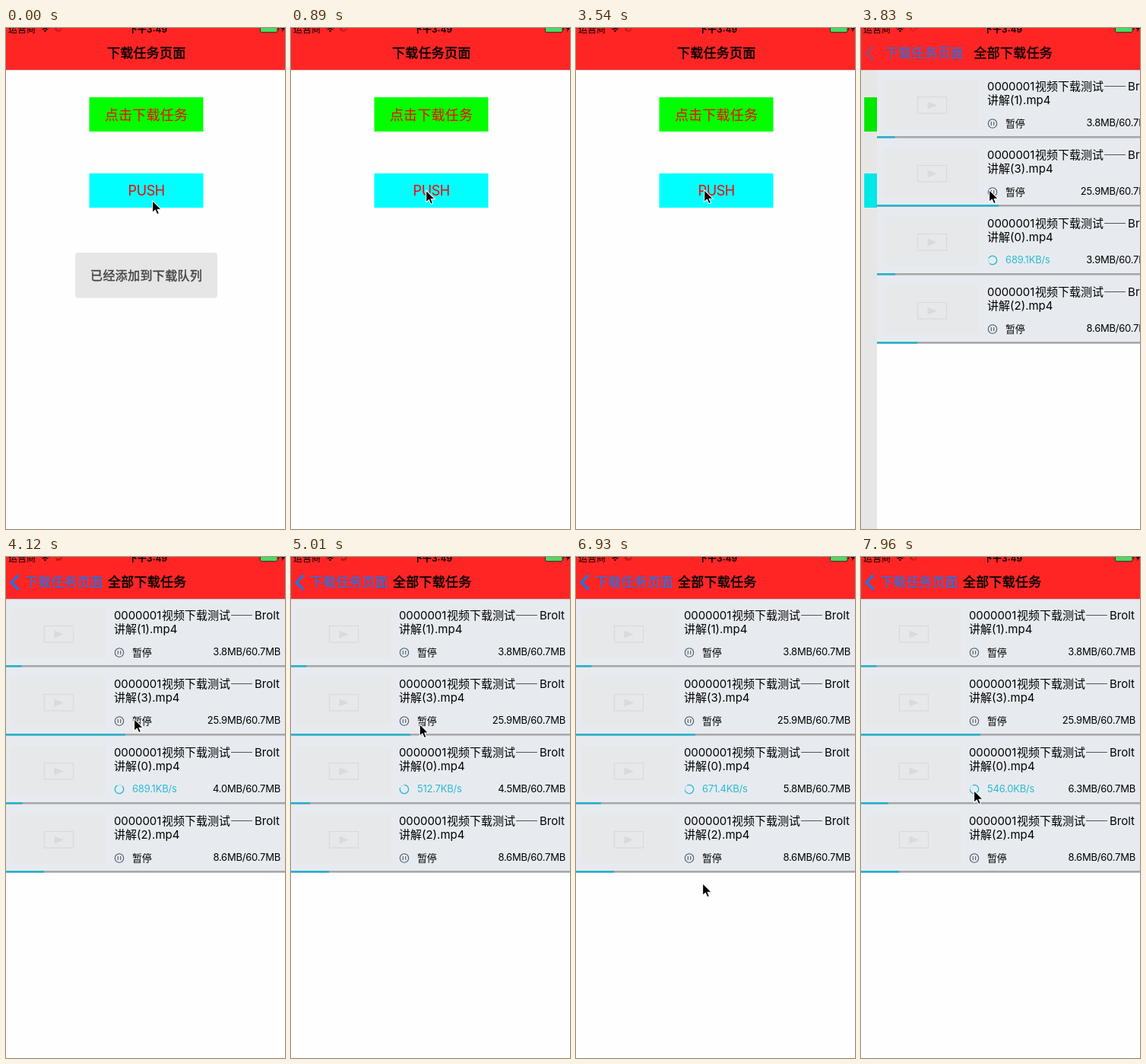
Animation of 367x658 px, one loop 8 s. Source, as an HTML page:

```html
<!DOCTYPE html>
<html lang="zh-CN">
<head>
<meta charset="utf-8">
<title>下载任务</title>
<style>
html, body { margin: 0; width: 100%; height: 100%; overflow: hidden; background: #fefefe; }
svg { display: block; width: 100%; height: 100%; }
text { font-family: Inter, "Noto Sans CJK SC", "Noto Sans CJK", sans-serif; white-space: pre; }
.title { font-size: 17px; letter-spacing: .25px; stroke: #000; stroke-width: .45px; }
.back { font-size: 17px; letter-spacing: .1px; fill: #0a7cff; }
.button { font-size: 18px; letter-spacing: .2px; fill: #f00; text-anchor: middle; }
.toast { font-size: 16px; letter-spacing: .35px; fill: #444; stroke: #444; stroke-width: .45px; text-anchor: middle; }
.name { font-size: 15px; }
.cjk { font-family: "Noto Sans CJK SC", "Noto Sans CJK", sans-serif; }
.small { font-size: 13px; letter-spacing: -.22px; }
.end { text-anchor: end; }
.carrier { font-size: 12px; }
.clock { font-size: 12px; font-weight: 600; }
</style>
</head>
<body>
<svg viewBox="0 0 367 658" preserveAspectRatio="none">
  <rect width="367" height="658" fill="#fefefe"/>
  <g id="home">
    <rect x="109.5" y="91" width="150" height="45" fill="#0f0"/>
    <text class="button" x="184.5" y="120.5">点击下载任务</text>
    <rect x="109.5" y="191" width="150" height="45" fill="#0ff"/>
    <text class="button" x="184.7" y="220" style="letter-spacing:-.4px">PUSH</text>
    <g id="toast">
      <rect x="91" y="295" width="187" height="59.5" rx="4" fill="#e6e6e6"/>
      <text class="toast" x="184.7" y="330.5">已经添加到下载队列</text>
    </g>
  </g>
  <rect id="dim" width="367" height="658"/>

  <g id="list">
    <rect x="-3" y="55" width="375" height="603" fill="#fefefe"/>
    <g id="rows"></g>
  </g>

  <rect width="367" height="55" fill="#ff2525"/>
  <rect y="54.8" width="367" height=".6" fill="#a66" opacity=".6"/>
  <text id="homeTitle" class="title" x="133" y="39">下载任务页面</text>
  <path id="chevron" d="M16.6 23.8 7.1 33.4 16.6 43" fill="none" stroke="#0a7cff" stroke-width="3"/>
  <text id="backLabel" class="back" x="25" y="39">下载任务页面</text>
  <text id="listTitle" class="title" x="134" y="39">全部下载任务</text>

  <text class="carrier" x="3" y="5.5">运营商</text>
  <g fill="none" stroke="#000" stroke-width="1.5">
    <path d="M48.3 2.2A4.5 4.5 0 0 1 54.7 2.2M46.3 .3A7.3 7.3 0 0 1 56.7 .3"/>
    <path d="M51.5 5.6 49.8 3.8A2.5 2.5 0 0 1 53.2 3.8Z" fill="#000" stroke="none"/>
  </g>
  <g id="activity"></g>
  <text class="clock" x="161" y="5.5">下午3:49</text>
  <rect x="334.5" y="-5" width="22.5" height="10.7" rx="2" fill="#4cd964" stroke="#222" stroke-width=".9"/>
  <path d="M358.6-1.5V2.5" stroke="#222" stroke-width="1.4"/>
  <path d="M365-4 361.5 1.2H364L362.7 5.5 367 0H364.6Z"/>

  <path id="cursor" d="M.6 .6V16.6L4.3 13.2 6.8 18.8 9.5 17.6 7.1 12.2H12.2Z"
        stroke="#fff" stroke-width="1.1" stroke-linejoin="round"/>
</svg>
<script>
const LOOP = 8000, STEP = 147.4, TOTAL = 60.7, WIDTH = 375, EDGE = -3;
const $ = id => document.getElementById(id);

const files = [[1, 3.8], [3, 25.9], [0, 3.9], [2, 8.6]];
const barWidth = mb => mb / TOTAL * WIDTH;
const sizeText = mb => `${mb.toFixed(1)}MB/${TOTAL}MB`;

const pauseIcon = `<g fill="none" stroke="#4b5768" stroke-width="1.1">
  <circle cx="149" cy="70.5" r="5.7"/><path d="M147.3 68V73M150.7 68V73"/></g>`;
const ringIcon = `<g id="ring" fill="none" stroke="#2fb9d3" stroke-width="1.3">
  <circle cx="149" cy="70" r="5.7" opacity=".25"/>
  <path d="M149 64.3A5.7 5.7 0 1 1 143.5 68.5"/></g>`;

$('rows').innerHTML = files.map(([index, mb], row) => {
  const active = index === 0;
  const status = active
    ? `${ringIcon}<text id="speed" class="small" x="166" y="74.3" fill="#2fb9d3"></text>`
    : `${pauseIcon}<text class="small" x="166" y="74.5">暂停</text>`;
  return `<g transform="translate(0 ${55 + row * 90})">
    <rect x="${EDGE}" width="${WIDTH}" height="90" fill="#e7ebf0"/>
    <rect x="6.5" y="13.5" width="125" height="64" fill="#e7e8ea"/>
    <rect x="50.5" y="35.5" width="38" height="21.5" fill="none" stroke="#d9dadc" stroke-width="1.2"/>
    <path d="M63.5 41.5V51.5L76 46.5Z" fill="#d9dadc"/>
    <g class="name">
      <text x="142" y="26.7" style="letter-spacing:-.1px">0000001</text>
      <text class="cjk" x="205" y="26.7">视频下载测试——</text>
      <text class="end" x="360" y="26.7">Brolt</text>
      <text class="cjk" x="142" y="44.5">讲解</text>
      <text x="172" y="44.5">(${index}).mp4</text>
    </g>
    ${status}
    <text ${active ? 'id="size"' : ''} class="small end" x="361" y="74.3">${sizeText(mb)}</text>
    <rect x="${EDGE}" y="87" width="${WIDTH}" height="2.6" fill="#a8a8a8"/>
    <rect ${active ? 'id="bar"' : ''} x="${EDGE}" y="87" width="${barWidth(mb)}" height="2.6" fill="#2bb1cd"/>
  </g>`;
}).join('');

$('activity').innerHTML = Array.from({ length: 12 }, (_, i) =>
  `<path d="M0-2.6V-5.2" stroke="#300" stroke-width="1" opacity="${.1 + i * .06}" transform="rotate(${i * 30})"/>`
).join('');

// Keys are [step, ...values], eased or linear between neighbours.
const cursorKeys = [[0, 192, 226], [3, 192, 226], [8, 169, 205], [16, 169, 205], [19, 172, 210],
  [23, 168, 212], [33, 168, 212], [39, 176, 304], [41, 176, 304], [45, 166, 428], [48, 166, 428],
  [53, 148, 306], [55, 148, 306]];
const sizeKeys = [[0, 3.9], [26, 3.9], [28, 4], [32, 4.4], [40, 4.9], [48, 5.9], [54, 6.3], [55, 6.3]];
const speeds = [[0, '689.1'], [31, '512.7'], [38, '388.3'], [45, '671.4'], [52, '546.0']];

const smooth = u => u * u * (3 - 2 * u);
const clamp = u => Math.min(1, Math.max(0, u));
function sample(keys, n, ease = u => u) {
  const i = Math.max(1, keys.findIndex(key => key[0] >= n));
  const [from, ...a] = keys[i - 1], [to, ...b] = keys[i];
  const u = ease((n - from) / (to - from));
  return a.map((value, j) => value + (b[j] - value) * u);
}
const move = (id, x, y = 0, more = '') => $(id).setAttribute('transform', `translate(${x} ${y}) ${more}`);
const fade = (id, opacity) => $(id).setAttribute('opacity', opacity);

function draw(n) {
  const rest = n <= 24 ? 1 : n >= 28 ? 0 : Math.exp(-.8 * (n - 24) ** 1.78);
  const done = 1 - rest;
  move('home', -WIDTH * .3 * done);
  move('list', WIDTH * rest);
  fade('dim', .1 * done);
  fade('toast', clamp((6 - n) / 3));

  move('homeTitle', -108 * done);
  move('backLabel', 108 * rest);
  move('listTitle', 225 * rest);
  fade('homeTitle', clamp(1 - done * 1.08));
  fade('backLabel', done);
  fade('listTitle', done);
  fade('chevron', clamp(1 - rest * 10));

  const [mb] = sample(sizeKeys, n);
  $('size').textContent = sizeText(mb);
  $('bar').setAttribute('width', barWidth(mb));
  $('speed').textContent = speeds.findLast(([from]) => n >= from)[1] + 'KB/s';
  $('ring').setAttribute('transform', `rotate(${n * 53} 149 70)`);
  move('activity', 69, 0, `rotate(${n * 60})`);
  move('cursor', ...sample(cursorKeys, n, smooth));
}

const start = performance.now();
function tick() {
  const time = (performance.now() - start) % LOOP;
  draw(Math.floor(time / STEP + .06));
  requestAnimationFrame(tick);
}
tick();
</script>
</body>
</html>
```
